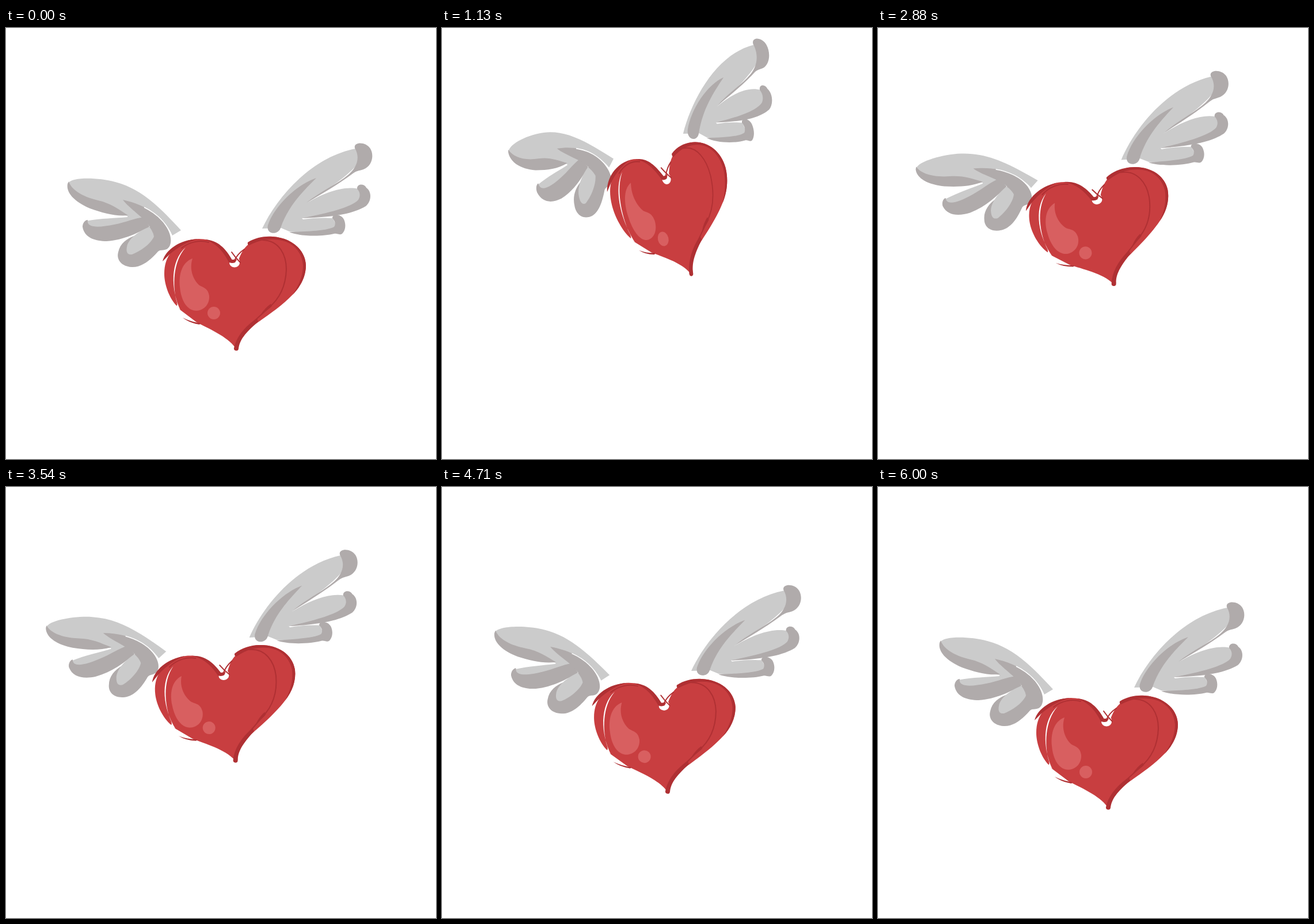
An HTML page that plays this animation: 747 by 750 pixels, repeating every 6.04 s.

```html
<!DOCTYPE html>
<html>
<head>
<meta charset="utf-8">
<title>Winged heart</title>
<style>
html, body { margin: 0; width: 100%; height: 100%; overflow: hidden; background: #fff; }
svg { display: block; width: 747px; height: 750px; }
.light { fill: #cbcbcb; }
.shade { fill: #b0abab; }
.red { fill: #c83e40; }
.dark { fill: #af3033; }
.shine { fill: #d85f60; }
.white { fill: #fff; }
.line { fill: none; stroke: #af3033; stroke-width: 2; stroke-linecap: round; }
.slit { fill: none; stroke: #fff; stroke-width: 1.5; }
</style>
</head>
<body>
<svg viewBox="0 0 747 750">
<g id="body">
  <g id="left">
    <path class="light" d="M108 270C115 259 160 260 190 268C235 280 265 310 304 352L289 361C285 352 280 345 274 340L246 346L190 355C160 354 142 347 139 336C165 331 190 331 211 329V327C160 318 115 300 108 270Z"/>
    <path class="shade" d="M109 267C113 280 130 293 160 300C182 305 195 315 212 326C190 328 168 322 146 314C118 302 104 286 107 271Z"/>
    <path class="shade" d="M142 334C137 334 133 340 133 346C136 365 155 371 175 371C205 369 230 356 249 346L241 329C222 331 209 338 188 342C164 347 139 349 142 334Z"/>
    <path class="shade" d="M203 299C240 307 267 325 278 345C290 364 288 380 279 385C272 388 269 385 264 389C250 405 235 417 218 416C197 414 192 400 195 390C198 375 210 366 225 361C235 352 244 348 250 346C240 330 215 315 203 299Z"/>
    <path class="light" d="M249 346C235 352 213 364 210 381C208 391 212 395 219 394C235 388 252 375 257 363C256 356 252 350 249 346Z"/>
    <path class="slit" d="M240 312C262 323 277 337 287 359"/>
  </g>
  <g id="right">
    <path class="light" d="M445 349C470 295 530 225 607 210L620 225C600 255 560 280 520 306C550 288 585 274 612 280L620 295C600 318 550 326 514 331L516 333C535 330 555 330 568 331L574 345C555 356 515 357 492 354L478 348Z"/>
    <path class="shade" d="M606 209C603 198 625 197 633 210C640 222 636 240 621 246C612 249 609 248 600 255C580 270 550 288 522 304C548 283 575 272 595 255C607 245 617 228 606 209Z"/>
    <path class="shade" d="M610 280C609 271 622 270 626 278C636 285 635 302 625 310C605 322 575 329 514 331C560 322 600 312 612 299C617 291 614 284 610 280Z"/>
    <path class="shade" d="M567 331C566 323 582 323 587 333C591 342 590 352 584 358C579 361 576 357 570 358C550 363 510 363 492 355C530 354 560 352 570 346C574 340 570 334 567 331Z"/>
    <path class="shade" d="M539 261C505 272 466 310 455 343C451 360 473 361 477 348C490 310 515 285 539 261Z"/>
  </g>
  <path class="red" d="M398 556C385 537 350 522 331 512L302 490L297 484C283 470 275 445 275 428C275 412 279 402 284 394C290 379 310 368 335 367C358 367 378 378 392 403L404 403C410 388 416 379 425 374C440 365 452 363 463 363C495 365 520 385 521 413C521 432 512 450 498 464C475 488 440 510 425 521C410 535 404 545 404 557Z"/>
  <path class="dark" d="M272 406C277 386 302 368 334 367C318 371 300 380 284 394Z"/>
  <path class="line" d="M305 383C320 371 338 369 352 373"/>
  <path class="dark" d="M345 368C368 369 382 384 393 404L400 402L397 410L388 409C377 388 366 375 345 368Z"/>
  <path class="white" d="M388 408Q393 410 398 408L403 400Q407 404 406 409A9 8 0 0 1 388 408Z"/>
  <path class="line" d="M392 390Q398 399 407 408M414 385Q402 393 396 406"/>
  <path class="dark" d="M420 373C434 364 450 362 463 363C495 365 520 385 521 413C521 432 512 450 498 464C510 446 516 430 516 413C514 386 494 369 466 368C448 367 435 372 423 378Q419 378 420 373Z"/>
  <path class="line" d="M446 369C475 370 487 395 487 420C486 450 475 472 455 488C443 500 432 508 424 518"/>
  <path class="dark" d="M460 480Q450 487 443 498Q456 490 462 484ZM436 505C414 520 400 538 396 557A4 4 0 0 0 404 558C406 543 415 531 438 511Z"/>
  <path class="dark" d="M307 504Q320 511 338 514L336 516Q318 513 307 504Z"/>
  <path class="white" d="M312 382C285 405 286 455 303 491L296 484Q299 482 296 474C290 450 289 408 312 382Z"/>
  <path class="shine" d="M324 401C305 408 300 430 302 450C304 475 315 492 331 492C345 491 354 480 353 466C351 452 342 452 335 447C325 437 318 420 324 401Z"/>
  <circle class="shine" cx="361" cy="496" r="11"/>
</g>
</svg>
<script>
const LOOP = 6040, STEP = 1000 / 24, BEAT = 380;
const { PI, sin, cos, min, max } = Math;

const clamp = (v, lo, hi) => min(hi, max(lo, v));
const part = (t, from, to) => clamp((t - from) / (to - from), 0, 1);
const ease = (t, from, to) => (1 - cos(PI * part(t, from, to))) / 2;

const place = (id, transform) =>
  document.getElementById(id).setAttribute('transform', transform);

function pose(t) {
  // Leap up, hover, then sink back while the tilt levels out
  const leap = ease(t, 200, 790);
  const level = 1 - ease(t, 1500, 5500);
  const stretch = ease(t, 200, 580) * (1 - ease(t, 900, 1750));
  const drift = sin(PI * part(t, 1500, LOOP) ** 1.15) ** 2;
  const x = 9 * stretch - 13.7 * drift;
  const y = -140 * leap * (1 - ease(t, 1500, LOOP));
  const tilt = -13.8 * leap * level;

  // Wings drop, beat twice and stay low until the body levels out
  const beat = cos(2 * PI * (clamp(t, 200, 200 + 2 * BEAT) - 200) / BEAT);
  const flap = ease(t, 0, 200) * beat * level;

  place('body', `translate(${398 + x} ${463 + y}) rotate(${tilt}) scale(${1 - .188 * stretch} ${1 + .168 * stretch}) translate(-398 -463)`);
  place('left', `rotate(${-9.5 * flap} 346 373)`);
  place('right', `rotate(${10.8 * flap} 457 389)`);
}

function draw() {
  const now = performance.now() % LOOP;
  pose(Math.floor((now + 5) / STEP) * STEP);
  requestAnimationFrame(draw);
}
draw();
</script>
</body>
</html>
```
